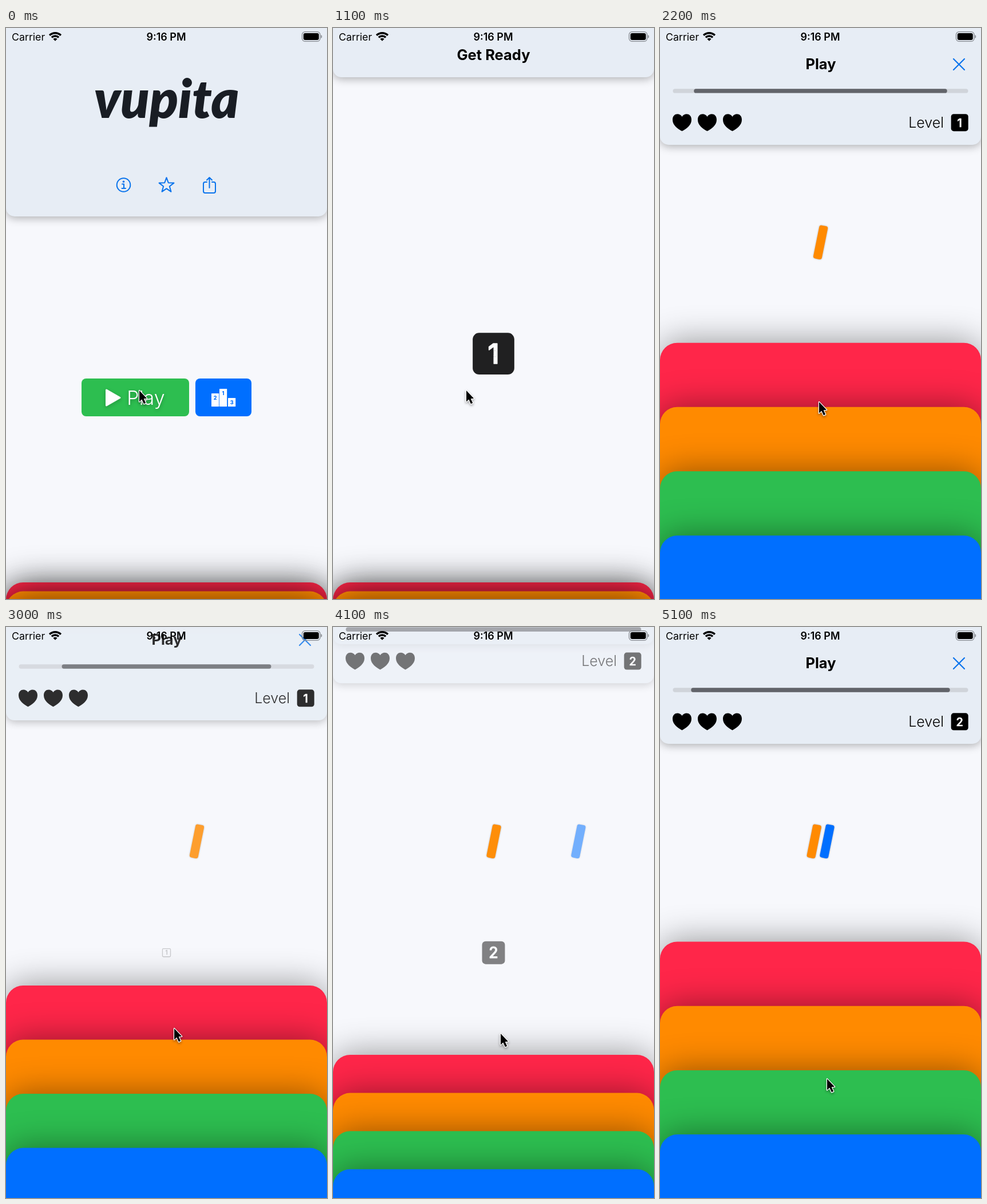
An HTML page with a canvas that plays this animation: 561 px wide and 997 px high, repeating every 5.2 s.

```html
<!DOCTYPE html>
<html lang="en">
<head>
<meta charset="utf-8">
<title>Colour tap game</title>
<style>
html, body { margin: 0; width: 100%; height: 100%; overflow: hidden; background: #f7f8fc; }
canvas { display: block; width: 561px; height: 997px; }
</style>
</head>
<body>
<canvas id="stage" width="561" height="997"></canvas>
<script>
const LOOP = 5200, STEP = 100, W = 561, H = 997, MID = 280.5;
const SANS = 'Inter, "Open Sans", sans-serif';
const RED = '#ff2649', ORANGE = '#ff8a00', GREEN = '#2dbe50', BLUE = '#006fff', LINK = '#0873ec';

// Start times of the screen changes
const READY = 280, SWAP_1 = 850, PLAY_1 = 1419, NEXT = 2935, SWAP_2 = 3450, PLAY_2 = 3965;
const BOUNCY = 0.76;

let ctx = document.getElementById('stage').getContext('2d');
const layer = Object.assign(document.createElement('canvas'), { width: W, height: H }).getContext('2d');

const clamp = v => Math.max(0, Math.min(1, v));

// Damped spring from 0 to 1
function spring(ms, damping = 0.825) {
  if (ms <= 0) return 0;
  const s = ms / 1000, omega = 2 * Math.PI / 0.55;
  const root = Math.sqrt(1 - damping * damping), angle = omega * root * s;
  return 1 - Math.exp(-damping * omega * s) * (Math.cos(angle) + damping / root * Math.sin(angle));
}

function cursorAt(t) {
  const path = [[0, 232, 632], [1750, 232, 632], [2200, 277, 652], [2750, 293, 700],
    [3500, 293, 700], [4000, 292, 709], [4750, 292, 709], [5100, 291, 788]];
  for (let i = 1; i < path.length; i++) {
    const [t0, x0, y0] = path[i - 1], [t1, x1, y1] = path[i];
    if (t <= t1) {
      const k = (t - t0) / (t1 - t0), e = k * k * (3 - 2 * k);
      return [x0 + (x1 - x0) * e, y0 + (y1 - y0) * e];
    }
  }
  return path[path.length - 1].slice(1);
}

// Draws on a separate layer, so that overlapping parts fade as one
function fade(draw, alpha) {
  const base = ctx;
  layer.resetTransform();
  layer.clearRect(0, 0, W, H);
  layer.setTransform(base.getTransform());
  ctx = layer;
  draw();
  ctx = base;
  ctx.resetTransform();
  ctx.globalAlpha = alpha;
  ctx.drawImage(layer.canvas, 0, 0);
}

function group(draw, { x = 0, y = 0, scale = 1, alpha = 1, rotate = 0 } = {}) {
  if (alpha <= 0.004 || scale <= 0) return;
  ctx.save();
  ctx.translate(x, y);
  ctx.rotate(rotate);
  ctx.scale(scale, scale);
  if (alpha < 1) fade(draw, alpha);
  else draw();
  ctx.restore();
}

function shadow(alpha = 0, blur = 0, dy = 0) {
  ctx.shadowColor = `rgba(0,0,0,${alpha})`;
  ctx.shadowBlur = blur;
  ctx.shadowOffsetY = dy;
}

function box(x, y, w, h, r, color) {
  ctx.fillStyle = color;
  ctx.beginPath();
  ctx.roundRect(x, y, w, h, r);
  ctx.fill();
}

function text(str, x, y, font, color = '#000', align = 'center') {
  ctx.font = font;
  ctx.textAlign = align;
  ctx.fillStyle = color;
  ctx.fillText(str, x, y);
}

function shape(points, close = true) {
  ctx.beginPath();
  points.forEach(([x, y]) => ctx.lineTo(x, y));
  if (close) ctx.closePath();
}

function pen(color, width) {
  ctx.strokeStyle = color;
  ctx.lineWidth = width;
  ctx.lineCap = ctx.lineJoin = 'round';
}

function badge(digit, filled) {
  if (filled) box(-42, -42, 84, 84, 13, '#000');
  else {
    pen('#000', 7);
    ctx.beginPath();
    ctx.roundRect(-38.5, -38.5, 77, 77, 9);
    ctx.stroke();
  }
  const color = filled ? '#fff' : '#000';
  text(digit, 0, 20.5, `500 56px ${SANS}`, color);
  pen(color, 2);
  ctx.strokeText(digit, 0, 20.5);
}

function header(height, presence, draw) {
  group(() => {
    shadow(0.3, 15, 3);
    box(0, -60, W, height + 60, [0, 0, 15, 15], '#e7edf5');
    shadow();
    draw();
  }, { y: (presence - 1) * (height + 20), alpha: presence });
}

function titleHeader(title, presence) {
  header(86, presence, () => text(title, MID, 55.5, `700 25.5px ${SANS}`));
}

function infoIcon() {
  ctx.beginPath();
  ctx.arc(0, 0, 11.8, 0, 7);
  ctx.stroke();
  shape([[-2.5, -1.5], [0.5, -1.5], [0.5, 6]], false);
  ctx.stroke();
  shape([[-3, 6], [3.5, 6]], false);
  ctx.stroke();
  ctx.beginPath();
  ctx.arc(0, -5.7, 1.8, 0, 7);
  ctx.fill();
}

function starIcon() {
  shape(Array.from({ length: 10 }, (_, i) => {
    const r = i % 2 ? 5.6 : 13.6, a = i * Math.PI / 5 - Math.PI / 2;
    return [r * Math.cos(a), r * Math.sin(a) + 0.8];
  }));
  ctx.stroke();
}

function shareIcon() {
  ctx.beginPath();
  ctx.moveTo(-4.5, -5);
  ctx.lineTo(-7.5, -5);
  ctx.quadraticCurveTo(-10.5, -5, -10.5, -2);
  ctx.lineTo(-10.5, 11);
  ctx.quadraticCurveTo(-10.5, 14, -7.5, 14);
  ctx.lineTo(7.5, 14);
  ctx.quadraticCurveTo(10.5, 14, 10.5, 11);
  ctx.lineTo(10.5, -2);
  ctx.quadraticCurveTo(10.5, -5, 7.5, -5);
  ctx.lineTo(4.5, -5);
  ctx.moveTo(0, 5);
  ctx.lineTo(0, -12.5);
  ctx.moveTo(-4.5, -8.5);
  ctx.lineTo(0, -13);
  ctx.lineTo(4.5, -8.5);
  ctx.stroke();
}

function homeHeader() {
  text('vupita', MID, 157, 'italic 900 92px Lato, sans-serif', '#191d24');
  pen(LINK, 2);
  ctx.fillStyle = LINK;
  [infoIcon, starIcon, shareIcon].forEach((icon, i) => group(icon, { x: 205.5 + i * 75, y: 274 }));
}

function homeButtons() {
  box(132, 612, 188, 66, 8, GREEN);
  box(331, 612, 98, 66, 8, BLUE);
  pen('#fff', 3);
  ctx.fillStyle = '#fff';
  shape([[175.5, 632], [199, 645.5], [175.5, 659]]);
  shadow(0.3, 6, 2);
  ctx.stroke();
  text('Play', 244.5, 658, `300 34px ${SANS}`, '#fff');
  shadow();
  shape([[175.5, 632], [199, 645.5], [175.5, 659]]);
  ctx.fill();
  [['2', 359, 638], ['1', 373, 630], ['3', 388, 646]].forEach(([place, x, y]) => {
    box(x, y, 13.2, 661 - y, 0.5, '#fff');
    text(place, x + 6.6, y + 11, `800 9px ${SANS}`, BLUE);
  });
}

function heart() {
  ctx.fillStyle = '#000';
  ctx.beginPath();
  ctx.moveTo(0, -10);
  ctx.bezierCurveTo(-4, -17, -16.5, -16.5, -16.5, -4.5);
  ctx.bezierCurveTo(-16.5, 5, -6.5, 12, 0, 15.2);
  ctx.bezierCurveTo(6.5, 12, 16.5, 5, 16.5, -4.5);
  ctx.bezierCurveTo(16.5, -16.5, 4, -17, 0, -10);
  ctx.fill();
}

function playHeader(level, left) {
  text('Play', MID + 0.5, 72, `700 25.5px ${SANS}`);
  pen(LINK, 2.2);
  shape([[513, 54], [532, 73]], false);
  ctx.stroke();
  shape([[532, 54], [513, 73]], false);
  ctx.stroke();
  box(22.5, 106.3, 516, 7.4, 3.7, '#d0d4da');
  box(MID - 258 * left, 106.3, 516 * left, 7.4, 3.7, '#62646a');
  for (let i = 0; i < 3; i++) group(heart, { x: 38.5 + i * 44, y: 165 });
  text('Level', 496, 174, `300 25px ${SANS}`, '#000', 'right');
  group(() => badge(level, true), { x: 523.7, y: 165.3, scale: 30 / 84 });
}

function stick(x, color, presence) {
  group(() => {
    shadow(0.3, 3, 0);
    box(-7.6, -29.5, 15.2, 59, 4, color);
    shadow();
  }, { x: x + (1 - presence) * 290, y: 374.3, alpha: presence, rotate: 0.2 });
}

function sheets(up) {
  [RED, ORANGE, GREEN, BLUE].forEach((color, i) => {
    const low = 968 + i * 15.6, high = 549.5 + i * 112.2;
    shadow(0.43, 60);
    box(0, low + (high - low) * up, W, 1200, 30, color);
    shadow();
  });
}

function statusBar() {
  text('Carrier', 10, 22, `400 17.8px ${SANS}`, '#000', 'left');
  text('9:16 PM', 280, 22, `600 18px ${SANS}`);
  pen('#000', 3.4);
  ctx.lineCap = 'butt';
  [14, 8.7].forEach(r => {
    ctx.beginPath();
    ctx.arc(86, 22.7, r, -Math.PI * 0.75, -Math.PI * 0.25);
    ctx.stroke();
  });
  ctx.beginPath();
  ctx.moveTo(86, 22.7);
  ctx.arc(86, 22.7, 5, -Math.PI * 0.75, -Math.PI * 0.25);
  ctx.fill();
  pen('#85898f', 1.3);
  ctx.beginPath();
  ctx.roundRect(517.5, 6.7, 31.5, 16.6, 5);
  ctx.stroke();
  box(519.8, 9, 27, 12, 3, '#000');
  box(550.4, 12.3, 1.8, 5.4, [0, 2, 2, 0], '#85898f');
}

function pointer(t) {
  const [x, y] = cursorAt(t);
  group(() => {
    shape([[0.5, 0.5], [0.5, 22], [5.3, 17.6], [9.3, 26.3], [12.9, 24.7], [9, 16.2], [15, 15.8]]);
    pen('#fff', 2.8);
    shadow(0.4, 4, 2);
    ctx.stroke();
    shadow();
    ctx.fillStyle = '#000';
    ctx.fill();
  }, { x: x + 0.6, y: y + 0.6, scale: 0.9 });
}

function render(t) {
  const toReady = spring(t - READY), toNext = spring(t - NEXT);
  const toPlay1 = spring(t - PLAY_1, BOUNCY), toPlay2 = spring(t - PLAY_2, BOUNCY);
  const swap1 = spring(t - SWAP_1), swap2 = spring(t - SWAP_2);
  const home = 1 - toReady, playing = toPlay1 - toNext + toPlay2;
  const second = t >= SWAP_2;

  ctx.fillStyle = '#f7f8fc';
  ctx.fillRect(0, 0, W, H);

  group(() => group(homeButtons, { x: -MID, y: -645 }), { x: MID, y: 645, scale: home, alpha: home });

  const popBadge = (digit, filled, presence) =>
    group(() => badge(digit, filled), { x: MID, y: 568.7, scale: presence, alpha: presence });
  popBadge('1', true, swap1 - toPlay1);
  popBadge('1', false, toReady - swap1);
  popBadge('2', true, swap2 - toPlay2);
  popBadge('1', false, toNext - swap2);

  if (second) {
    stick(269.3, ORANGE, spring(t - PLAY_2 + 150, BOUNCY));
    stick(292, BLUE, toPlay2);
  } else {
    stick(MID, ORANGE, toPlay1 - toNext);
  }

  sheets(playing);

  header(329, home, homeHeader);
  titleHeader('Get Ready', toReady - toPlay1);
  titleHeader('Next Level', toNext - toPlay2);
  const elapsed = second ? t - 4490 : Math.min(t, NEXT) - 1495;
  header(204, playing, () => playHeader(second ? '2' : '1', 1 - clamp(elapsed * 0.000202)));

  statusBar();
  pointer(t);
}

const start = performance.now();
function tick() {
  const t = (performance.now() - start) % LOOP;
  render(Math.floor(t / STEP) * STEP);
  requestAnimationFrame(tick);
}
tick();
</script>
</body>
</html>
```
